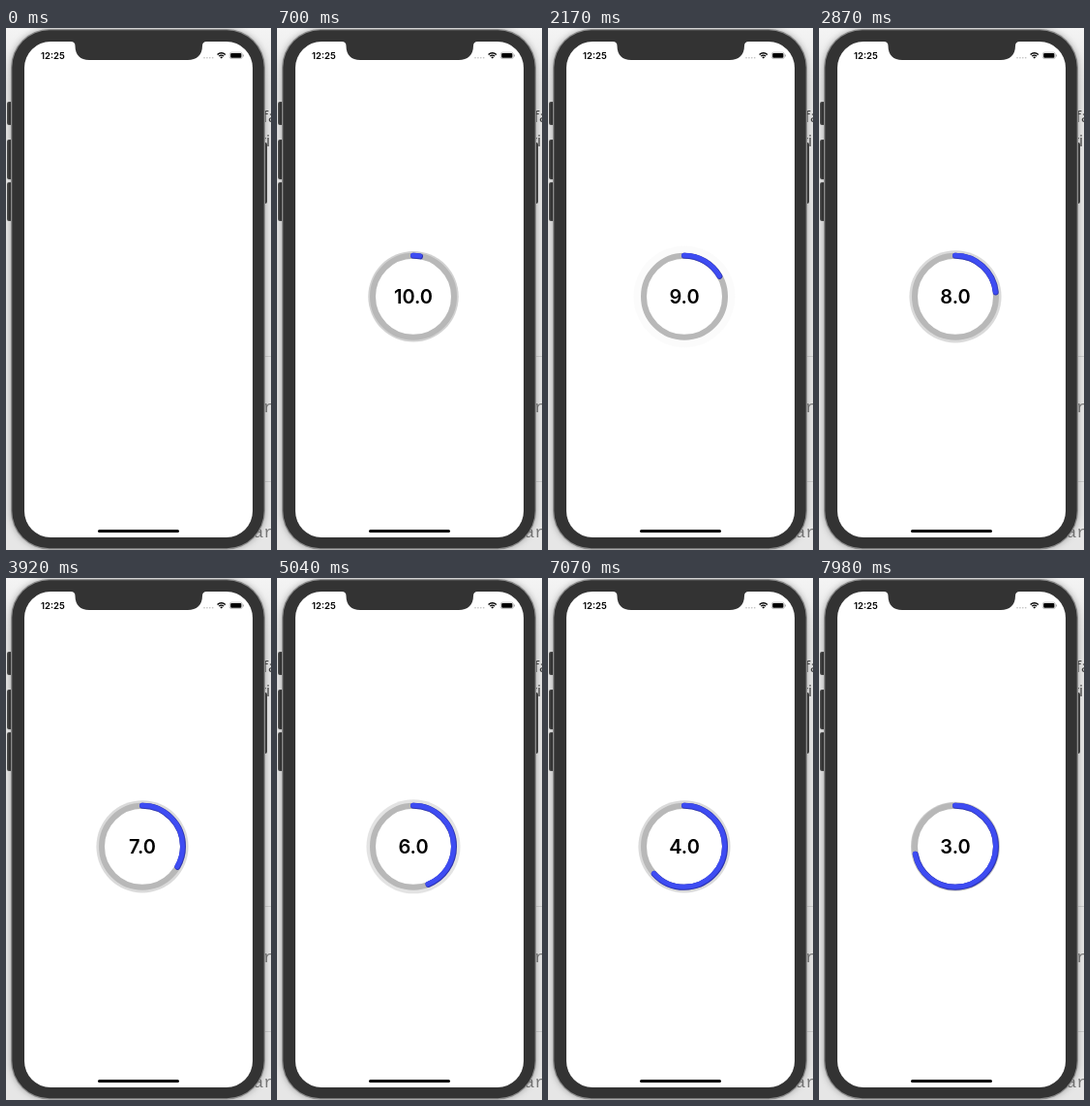
Write an HTML page with a canvas that moves like this. It is 274 by 538 pixels and loops after 8 s.

```html
<!DOCTYPE html>
<html lang="en">
<head>
<meta charset="utf-8">
<title>Countdown ring</title>
<style>
  html, body { margin: 0; width: 100%; height: 100%; overflow: hidden; background: #e6e6e6; }
  canvas { display: block; width: 274px; height: 538px; }
</style>
</head>
<body>
<canvas id="stage"></canvas>
<script>
const W = 274, H = 538;
const LOOP = 8000, STEP = 70, START = 420;
const SECOND = 1050, TOTAL = 10 * SECOND;
const CX = 141, CY = 276.8, R = 42, LINE = 6;

const canvas = document.getElementById('stage');
const dpr = window.devicePixelRatio || 1;
canvas.width = W * dpr;
canvas.height = H * dpr;
const ctx = canvas.getContext('2d');
ctx.scale(dpr, dpr);

function box(x, y, w, h, r, color) {
  ctx.fillStyle = color;
  ctx.beginPath();
  ctx.roundRect(x, y, w, h, r);
  ctx.fill();
}

function label(text, x, y, font, color, align = 'left') {
  ctx.font = font;
  ctx.fillStyle = color;
  ctx.textAlign = align;
  ctx.fillText(text, x, y);
}

function arc(x, y, r, from, to, width, color) {
  ctx.strokeStyle = color;
  ctx.lineWidth = width;
  ctx.beginPath();
  ctx.arc(x, y, r, from, to);
  ctx.stroke();
}

function drawBackdrop() {
  ctx.fillStyle = '#e6e6e6';
  ctx.fillRect(0, 0, W, H);
  const top = ctx.createLinearGradient(0, 0, 0, 60);
  top.addColorStop(0, '#f4f4f4');
  top.addColorStop(1, 'rgba(244,244,244,0)');
  ctx.fillStyle = top;
  ctx.fillRect(0, 0, W, 60);
  ctx.fillStyle = '#cccccc';
  ctx.fillRect(262, 338, 12, 1);
  ctx.fillRect(262, 467, 12, 1);
  const sans = '16px "Open Sans", sans-serif';
  const mono = '17px "Liberation Mono", monospace';
  label('fa', 265.5, 97, sans, '#444');
  label('ri', 262.5, 122, sans, '#444');
  label('r', 266, 396, mono, '#777');
  label('ar', 256, 525, mono, '#777');
}

function drawNotch() {
  ctx.fillStyle = '#333333';
  ctx.beginPath();
  ctx.moveTo(67, 13);
  ctx.lineTo(67, 14);
  ctx.quadraticCurveTo(71.5, 14, 71.5, 18.5);
  ctx.bezierCurveTo(71.5, 28, 77, 33, 86, 33);
  ctx.lineTo(188, 33);
  ctx.bezierCurveTo(197, 33, 203, 28, 203, 18.5);
  ctx.quadraticCurveTo(203, 14, 207.5, 14);
  ctx.lineTo(207.5, 13);
  ctx.fill();
}

function drawStatus() {
  label('12:25', 36, 32, '600 9.5px Inter, sans-serif', '#000');
  for (let i = 0; i < 4; i++) box(204.2 + i * 2.9, 30, 1.6, 1.6, 0.8, '#bbb');
  const a = -Math.PI * 0.75, b = -Math.PI * 0.25;
  arc(222.7, 31.6, 5.8, a, b, 1.5, '#000');
  arc(222.7, 31.6, 3.5, a, b, 1.4, '#000');
  arc(222.7, 31.6, 1, a, b, 2, '#000');
  ctx.strokeStyle = '#aaa';
  ctx.lineWidth = 0.7;
  ctx.beginPath();
  ctx.roundRect(231.3, 25.2, 13, 6.4, 1.8);
  ctx.stroke();
  box(232.2, 26, 11.2, 4.8, 1, '#000');
  box(245, 27.3, 1, 2.2, 0.5, '#aaa');
}

function drawPhone() {
  for (const [y, h] of [[76, 24], [115, 41], [159, 40]]) {
    box(1, y, 8, h, 2, '#4a4a4a');
    box(2.5, y + 1, 6, h - 2, 1, '#3a3a3a');
  }
  box(262, 118, 8, 63, 2, '#444');
  ctx.save();
  ctx.shadowColor = 'rgba(0,0,0,0.3)';
  ctx.shadowBlur = 6 * dpr;
  box(5, 1, 263, 536.5, 40, '#8c8c8c');
  ctx.restore();
  box(6.3, 2.3, 260.4, 534, 38.5, '#333333');
  box(19, 14, 236, 511, 27, '#ffffff');
  drawNotch();
  drawStatus();
  box(95, 517, 84, 3, 1.5, '#000');
}

// Smooth start and stop, close to the usual ease-in-out curve.
const ease = p => p * p * (3 - 2 * p);

function drawTimer(t) {
  const phase = ease((t % SECOND) / SECOND);
  const fade = 0.95 * (1 - phase) ** 2;
  const size = R + LINE / 2;
  ctx.fillStyle = `rgba(184,184,184,${fade})`;
  ctx.beginPath();
  ctx.arc(CX, CY, size + 10 * phase, 0, Math.PI * 2);
  ctx.fill();

  ctx.fillStyle = '#fff';
  ctx.beginPath();
  ctx.arc(CX, CY, R, 0, Math.PI * 2);
  ctx.fill();
  arc(CX, CY, R, 0, Math.PI * 2, LINE, '#b8b8b8');

  if (t > 0) {
    const from = -Math.PI / 2, to = from + Math.PI * 2 * t / TOTAL;
    ctx.lineCap = 'round';
    arc(CX, CY, R, from, to, LINE, '#2c33b4');
    arc(CX - 0.4, CY - 0.5, R, from, to, LINE - 1, '#3e4cf2');
    ctx.lineCap = 'butt';
  }

  const left = 10 - Math.floor(t / SECOND);
  label(left.toFixed(1), CX, 284, '600 20px Inter, sans-serif', '#000', 'center');
}

function frame(now) {
  const t = Math.floor((now % LOOP) / STEP) * STEP;
  drawBackdrop();
  drawPhone();
  if (t >= START) drawTimer(t - START);
}

const begin = performance.now();
function tick() {
  frame(performance.now() - begin);
  requestAnimationFrame(tick);
}
tick();
</script>
</body>
</html>
```
